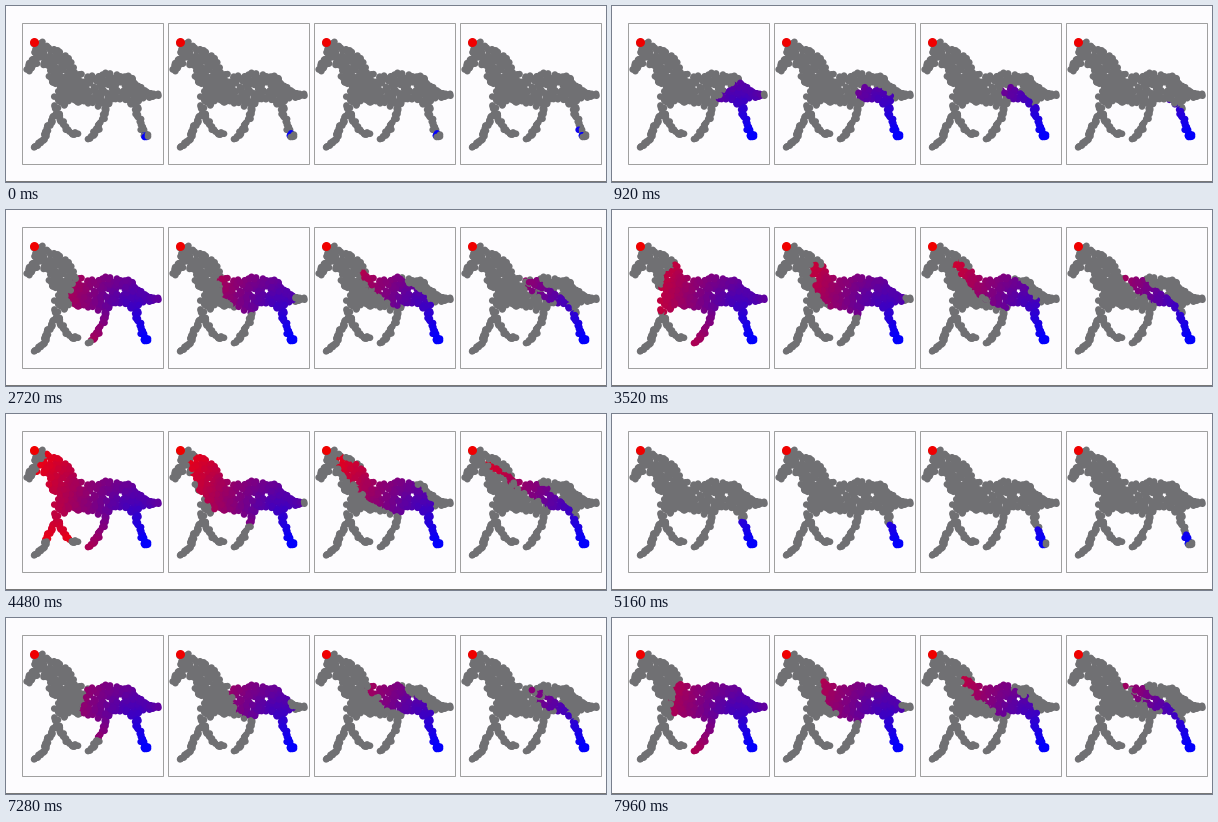
Write a matplotlib script that moves like this. It is 600 by 176 pixels and loops after 8000 ms.

```python
import matplotlib.pyplot as plt
import numpy as np
from matplotlib.animation import FuncAnimation
from matplotlib.patches import Rectangle
from matplotlib.path import Path

WIDTH, HEIGHT, DPI = 600, 176, 100
FRAMES, INTERVAL = 200, 40
SEARCH_MS = 5000
SEED_NODES = 4
PX = 72 / DPI
GREY = (0.44, 0.44, 0.45)
START, GOAL = (140, 130), (28, 36)
PANEL_X = (0, 146, 292, 438)
HEURISTIC_WEIGHTS = (0, 0.7, 0.92, 1)

BODY = [(29, 40), (38, 37), (44, 43), (53, 43), (61, 49), (67, 58), (71, 66),
        (82, 70), (92, 69), (102, 66), (114, 67), (124, 69), (130, 75),
        (134, 83), (143, 88), (151, 90), (146, 92), (134, 93), (130, 100),
        (130, 106), (126, 101), (118, 95), (108, 93), (103, 100), (98, 106),
        (94, 102), (88, 98), (75, 97), (62, 95), (57, 104), (53, 112),
        (47, 112), (47, 96), (46, 80), (41, 66), (36, 57), (31, 60),
        (23, 67), (20, 64), (23, 56), (28, 48)]
LIMBS = [
    [(48, 110), (43, 122), (38, 134), (26, 142)],
    [(53, 112), (58, 119), (63, 126), (73, 129)],
    [(100, 102), (97, 114), (89, 126), (83, 135)],
    [(130, 102), (133, 112), (136, 122), (140, 130)],
    [(132, 81), (141, 87), (152, 90)],
    [(28, 58), (21, 66)],
    [(29, 39), (38, 36)],
]


def fill_polygon(rng, corners, count):
    corners = np.array(corners)
    samples = rng.uniform(corners.min(0), corners.max(0), (12000, 2))
    return samples[Path(corners).contains_points(samples)][:count]


def scatter_along(rng, line, spacing=1.35, spread=1.2):
    line = np.array(line, float)
    lengths = np.hypot(*np.diff(line, axis=0).T)
    along = np.r_[0, np.cumsum(lengths)]
    s = np.arange(0, along[-1], spacing)
    points = np.c_[np.interp(s, along, line[:, 0]),
                   np.interp(s, along, line[:, 1])]
    return points + rng.normal(0, spread, points.shape).clip(-2, 2)


def make_horse():
    rng = np.random.default_rng(7)
    limbs = [scatter_along(rng, line) for line in LIMBS]
    foot = [START, (138.6, 131), (142, 128.6), (142, 130.5)]
    return np.vstack([fill_polygon(rng, BODY, 470), *limbs, foot, [GOAL]])


def graph_distances(points, source, radius=8):
    gaps = np.hypot(*(points[:, None] - points[None]).transpose(2, 0, 1))
    gaps[gaps > radius] = np.inf
    dist = np.full(len(points), np.inf)
    dist[source] = 0
    for _ in range(80):
        dist = (dist[:, None] + gaps).min(axis=0)
    return dist


def visit_order(dist, to_goal, weight):
    """Nodes in the order a weighted A* search settles them."""
    score = dist + weight * to_goal
    order = np.argsort(score, kind="stable")
    return order[score[order] <= dist[-1] + 1e-9]


horse = make_horse()
start_index = len(horse) - 5
distance = graph_distances(horse, start_index)
to_goal = np.hypot(*(horse - GOAL).T)
shade = np.clip(distance / distance[-1], 0, 1)
search_colors = np.c_[shade, 0 * shade, 1 - shade]
orders = [visit_order(distance, to_goal, w) for w in HEURISTIC_WEIGHTS]

fig = plt.figure(figsize=(WIDTH / DPI, HEIGHT / DPI), dpi=DPI,
                 facecolor="#fdfcfe")
ax = fig.add_axes([0, 0, 1, 1])
ax.set(xlim=(0, WIDTH), ylim=(HEIGHT, 0))
ax.axis("off")
ax.plot([0, WIDTH], [174.5, 174.5], color="#777777", lw=PX)

clouds = []
for x in PANEL_X:
    ax.add_patch(Rectangle((x + 15.5, 16.5), 141, 141, fill=False,
                           ec="#a0a0a0", lw=PX))
    clouds.append(ax.scatter(horse[:, 0] + x, horse[:, 1],
                             s=(6.6 * PX) ** 2, color=GREY, linewidths=0))
    ax.scatter(GOAL[0] + x, GOAL[1], s=(9 * PX) ** 2, color="#f00000",
               linewidths=0, zorder=3)


def update(frame):
    progress = frame * INTERVAL % SEARCH_MS / SEARCH_MS
    for cloud, order in zip(clouds, orders):
        count = SEED_NODES + int((len(order) - SEED_NODES) * progress)
        colors = np.tile(GREY, (len(horse), 1))
        visited = order[:count]
        colors[visited] = search_colors[visited]
        cloud.set_facecolor(colors)
    return clouds


animation = FuncAnimation(fig, update, frames=FRAMES, interval=INTERVAL,
                          repeat=True, repeat_delay=0)
plt.show()
```
